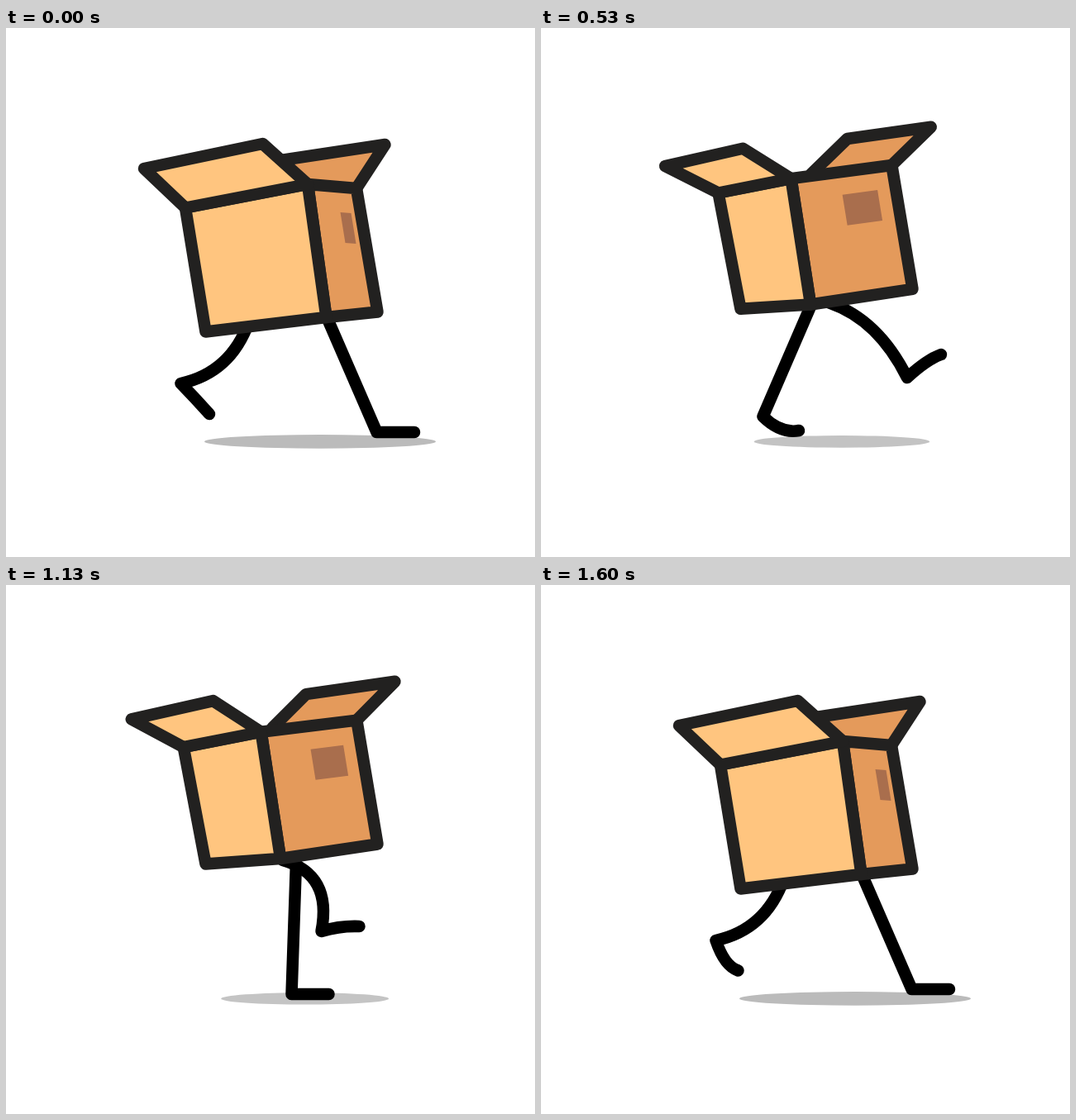
Animation, 640 px wide and 640 px high, one loop 1630 ms. Source, as an HTML page with a canvas:

```html
<!DOCTYPE html>
<html lang="en">
<head>
<meta charset="utf-8">
<title>Walking box</title>
<style>
  html, body { margin: 0; width: 100%; height: 100%; overflow: hidden; background: #fff; }
  canvas { display: block; }
</style>
</head>
<body>
<canvas id="stage" width="640" height="640"></canvas>
<script>
const ctx = document.getElementById('stage').getContext('2d');
const LOOP = 1630, INK = '#222120', FRONT = '#ffc57f', SIDE = '#e49a5b', LABEL = '#a96e4d';

const ease = s => s * s * (3 - 2 * s);
const lerp = (a, b, s) => a + (b - a) * s;
const swing = (c, half) => ease(1 - Math.abs(c % (2 * half) - half) / half);

// Leg poses: hip, thigh control, ankle, foot control, toe.
const plant = [386, 345, 417, 417, 448.5, 489, 471, 489, 494, 489];
const stand = [351, 335, 348, 415, 345.5, 495, 368, 495, 390.5, 495];
const pushA = [326, 337, 297, 404, 268.5, 470, 290, 491, 312, 487];
const pushB = [326, 337, 304, 408, 282, 478, 306, 499, 324.5, 495];
const backA = [293, 362, 276, 403, 203.5, 420, 220, 443, 238, 454.5];
const backB = [294, 355, 272, 417, 211.5, 430, 222, 461, 238.5, 466.5];
const trail = [294, 355, 272, 417, 211.5, 430, 229, 448, 246, 467];
const lift = [335, 333, 395, 350, 381.5, 419, 405, 412, 427.5, 413];
const kickA = [350, 333, 406, 353, 440, 423, 463, 402, 480.5, 395];
const kickB = [350, 333, 408, 353, 443, 423, 467, 401, 484, 395];
const land = [383, 345, 416, 413, 449.5, 481, 483, 483, 494, 468.5];

const legA = [[0, plant], [8, stand], [13, pushA], [19, backA], [28, lift], [33, kickA], [40, plant]];
const legB = [[0, trail], [8, lift], [13, kickB], [19, land], [20, plant], [28, stand], [33, pushB], [40, backB]];
const height = [[0, 343], [9, 311.5], [11.2, 311.5], [19.5, 343], [20, 343], [29.2, 311.5], [40, 343]];

// Corners at the two ends of the turn: x, y, then x, y.
const corners = {
  topLeft: [217, 217.5, 213.5, 231],
  topMid: [365, 189, 278, 218],
  topRight: [424, 194, 424.5, 193.5],
  botLeft: [241.5, 367.5, 241.5, 367.5],
  botMid: [387.5, 350, 302, 367],
  botRight: [449.5, 343.5, 449.5, 343.5],
  leftFar: [167, 170, 143.5, 204.5],
  leftNear: [310.5, 140, 218, 186.5],
  rightNear: [293, 166, 401, 160],
  rightFar: [458.5, 141, 477, 150],
  hinge: [280, 190, 345, 210],
  label1: [404.5, 223, 349, 232],
  label2: [417.5, 224, 403, 223.5],
  label3: [423.5, 261, 409, 260.5],
  label4: [410.5, 260, 355, 269]
};

function segment(keys, c) {
  let i = 0;
  while (i < keys.length - 2 && c >= keys[i + 1][0]) i++;
  return i;
}

function easedValue(keys, c) {
  const i = segment(keys, c), [t0, a] = keys[i], [t1, b] = keys[i + 1];
  return lerp(a, b, ease((c - t0) / (t1 - t0)));
}

// Smooth pose interpolation that never overshoots a key.
function poseAt(keys, c) {
  const i = segment(keys, c), span = keys[i + 1][0] - keys[i][0], s = (c - keys[i][0]) / span;
  return keys[i][1].map((a, d) => {
    const slope = k => (keys[k + 1][1][d] - keys[k][1][d]) / (keys[k + 1][0] - keys[k][0]);
    const tangent = k => {
      if (k === 0) return slope(0);
      if (k === keys.length - 1) return slope(k - 1);
      const p = slope(k - 1), q = slope(k);
      return p * q <= 0 ? 0 : 2 * p * q / (p + q);
    };
    const r = 1 - s;
    return lerp(a, keys[i + 1][1][d], ease(s)) + span * s * r * (tangent(i) * r - tangent(i + 1) * s);
  });
}

function drawLeg(keys, c) {
  const [hx, hy, tx, ty, ax, ay, fx, fy, ex, ey] = poseAt(keys, c);
  ctx.beginPath();
  ctx.moveTo(hx, hy);
  ctx.quadraticCurveTo(tx, ty, ax, ay);
  ctx.quadraticCurveTo(fx, fy, ex, ey);
  ctx.strokeStyle = '#000';
  ctx.stroke();
}

function drawShadow(c) {
  const s = swing(c, 10), grey = Math.round(187 + 10 * s);
  ctx.fillStyle = `rgb(${grey},${grey},${grey})`;
  ctx.beginPath();
  ctx.ellipse(380 - 20.5 * s, 500.4, 140 - 43 * s, 8.3 - 1.2 * s, 0, 0, 7);
  ctx.fill();
}

function drawBox(c) {
  const turn = swing(c, 20);
  const shape = (names, fill, outline = true, closed = true) => {
    ctx.beginPath();
    for (const name of names.split(' ')) {
      const [x0, y0, x1, y1] = corners[name];
      ctx.lineTo(lerp(x0, x1, turn), lerp(y0, y1, turn));
    }
    if (closed) ctx.closePath();
    ctx.fillStyle = fill;
    ctx.fill();
    ctx.strokeStyle = INK;
    if (outline) ctx.stroke();
  };
  ctx.save();
  ctx.translate(0, easedValue(height, c) - 343);
  shape('hinge rightNear rightFar topRight', SIDE, true, false);
  shape('topMid topRight botRight botMid', SIDE);
  shape('label1 label2 label3 label4', LABEL, false);
  shape('topLeft topMid botMid botLeft', FRONT);
  shape('topLeft leftFar leftNear topMid', FRONT);
  ctx.restore();
}

function draw() {
  // Poses advance 25 times a second, shown at 30 frames a second.
  const shown = Math.floor((performance.now() % LOOP + 4) * 0.03);
  const c = Math.ceil(shown * 5 / 6 - 0.5);
  ctx.fillStyle = '#fff';
  ctx.fillRect(0, 0, 640, 640);
  ctx.lineWidth = 14.5;
  ctx.lineCap = ctx.lineJoin = 'round';
  drawShadow(c);
  drawLeg(legA, c);
  drawLeg(legB, c);
  drawBox(c);
  requestAnimationFrame(draw);
}
draw();
</script>
</body>
</html>
```
